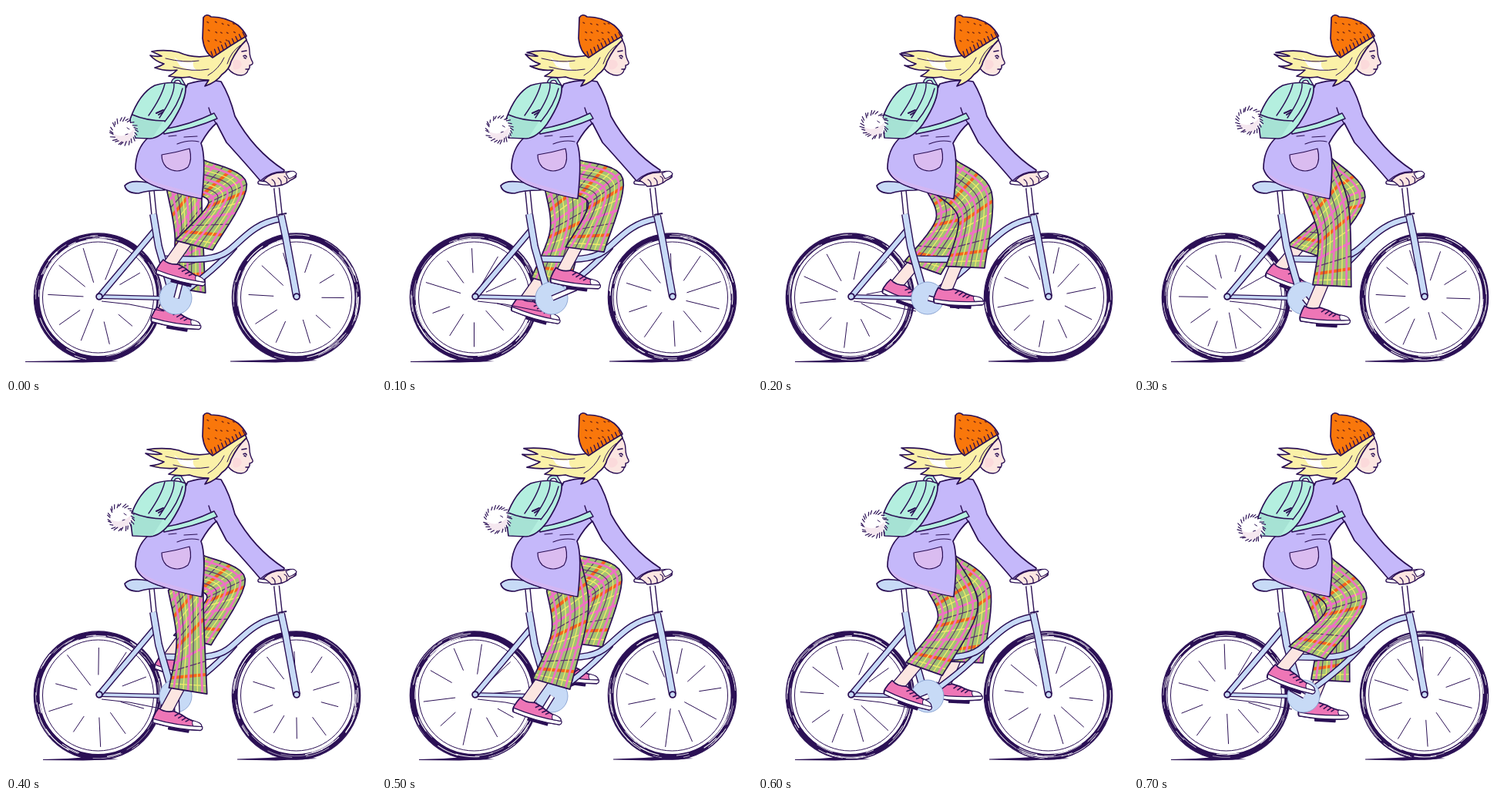
An HTML page with a canvas that plays this animation: 480x480 px, repeating every 800 ms.

```html
<!DOCTYPE html>
<html lang="en">
<head>
<meta charset="utf-8">
<title>Cyclist</title>
<style>
html, body { margin: 0; height: 100%; overflow: hidden; background: #fff; }
canvas { display: block; }
</style>
</head>
<body>
<canvas id="stage" width="480" height="480"></canvas>
<script>
const g = document.getElementById('stage').getContext('2d');
const INK = '#2b1055', BLUE = '#c7daf6', LILAC = '#c5b8fa', MINT = '#b4efdf', SKIN = '#fce6e1';
const STEP = 100, STEPS = 8, TAU = Math.PI * 2;
const HIP = [238, 214], THIGH = 64, SHIN = 127;

function random(seed) {
  return () => {
    seed = (seed * 16807 + 11) % 2147483647;
    return seed / 2147483647;
  };
}

function shape(d, fill, line = INK, width = 1.7) {
  const p = new Path2D(d);
  if (fill) { g.fillStyle = fill; g.fill(p); }
  if (line) { g.strokeStyle = line; g.lineWidth = width; g.stroke(p); }
}
const ink = (d, width = 1.4, color = INK) => shape(d, null, color, width);

function tube(d, width, color = BLUE) {
  ink(d, width + 2.6);
  ink(d, width - .2, color);
}

function arc(x, y, r, from, to, color, width) {
  g.beginPath();
  g.arc(x, y, r, from, to);
  g.strokeStyle = color;
  g.lineWidth = width;
  g.stroke();
}

function wheel(x, y, i, seed) {
  const rnd = random(seed + i * 977);
  arc(x, y, 79.5, 0, TAU, INK, 7);
  for (let k = 0; k < 34; k++) {
    const a = rnd() * TAU, r = 76.5 + rnd() * 6;
    arc(x + rnd() - .5, y, r, a, a + .1 + rnd() * .4, '#fff', .5 + rnd() * .6);
  }
  arc(x, y, 83.2, 0, TAU, INK, 1.2);
  arc(x, y, 72, 0, TAU, INK, 1);
  for (let k = 0; k < 10; k++) {
    const a = k / 10 * TAU + i * .21 + rnd() * .12, c = Math.cos(a), s = Math.sin(a);
    const r0 = 16 + rnd() * 20, r1 = 56 + rnd() * 12;
    ink(`M${x + c * r0} ${y + s * r0}L${x + c * r1} ${y + s * r1}`, 1);
  }
}

function ground(i) {
  const a = Math.min(48, 25 + 12 * i), b = Math.min(300, 291 + 4 * i);
  shape(`M${a} 461L80 460Q110 457 146 461L100 462.5L${a} 462Z`, INK, null);
  shape(`M${b} 460.5L340 459Q375 456 404 460L350 462.5L${b} 461.5Z`, INK, null);
}

// The pedal circle sets the foot; the knee follows from the two limb lengths.
function pose(i) {
  const turn = i / STEPS * TAU, a = turn - TAU / 4 + .1 * (1 - Math.cos(turn));
  const x = 204 + 30 * Math.cos(a), y = 362 + 33 * Math.sin(a);
  const tilt = (11 - 9 * Math.cos(a - .4)) * Math.PI / 180;
  const c = Math.cos(tilt), s = Math.sin(tilt);
  const foot = (u, v) => [x + u * c - v * s, y + u * s + v * c];

  const ankle = [x + 8, y + 4], dx = ankle[0] - HIP[0], dy = ankle[1] - HIP[1];
  const reach = Math.min(Math.hypot(dx, dy), THIGH + SHIN - 1);
  const bend = Math.acos((THIGH ** 2 + reach ** 2 - SHIN ** 2) / (2 * THIGH * reach));
  const swing = Math.atan2(dy, dx) - bend;
  const knee = [HIP[0] + THIGH * Math.cos(swing), HIP[1] + THIGH * Math.sin(swing)];

  const out = [knee[0] - HIP[0] - dx / 2, knee[1] - HIP[1] - dy / 2], len = Math.hypot(...out);
  const side = d => knee.map((n, k) => n + out[k] / len * d);
  return {
    x, y, tilt, foot,
    front: [[257, 200], side(17), foot(59, -28)],
    back: [[214 + (knee[0] - 254) * .4, 242], side(-38), foot(9, -28)]
  };
}

// Smooth curve through three points, t from 0 to 1.
function spline(p, t) {
  const k = t < .5 ? 0 : 1, f = t * 2 - k;
  const [a, b, d, e] = [k - 1, k, k + 1, k + 2].map(n => p[Math.max(0, Math.min(2, n))]);
  return b.map((n, c) => n + f / 2 * (d[c] - a[c] +
    f * (2 * a[c] - 5 * n + 4 * d[c] - e[c] + f * (3 * (n - d[c]) + e[c] - a[c]))));
}

// u runs from back edge to front edge, v from hip to hem.
function onLeg(p, u, v) {
  const f = spline(p.front, v);
  return spline(p.back, v).map((n, k) => n + (f[k] - n) * u);
}

const lengthwise = (p, u, back) =>
  Array.from({ length: 19 }, (_, k) => onLeg(p, u, (back ? 18 - k : k) / 18)).join('L');

function trousers(p) {
  const outline = 'M' + lengthwise(p, 1) + 'L' + lengthwise(p, 0, true) + 'Z';
  shape(outline, '#a3c272', null);
  g.save();
  g.clip(new Path2D(outline));
  const bands = [['#f4661c', 4], ['#f1ec6a', 1.4], ['#ee70c4', 3], ['#5a2f70', 1.2]];
  for (let k = 1; k < 14; k++) {
    const [color, width] = bands[k % 4], v = k / 14;
    ink(`M${onLeg(p, 0, v)}L${onLeg(p, 1, v)}`, width, color);
  }
  for (let k = 1; k < 8; k++) {
    const [color, width] = bands[1 + k % 3];
    ink('M' + lengthwise(p, k / 8), width * .9, color);
  }
  g.restore();
  ink(outline, 1.7);
}

function leg(i, far) {
  const p = pose(i);
  g.save();
  if (far) g.translate(-2, -4);
  tube(`M221 379L${p.foot(29, 23)}`, far ? 3 : 5, far ? INK : '#fff');
  shape(`M${onLeg(p, .08, .97)}L${p.foot(1, 4)}L${p.foot(17, 6)}L${onLeg(p, .42, .97)}Z`, SKIN, INK, 1.3);
  trousers(p);
  g.translate(p.x, p.y);
  g.rotate(p.tilt);
  shape('M17 20H43V25H17Z', INK);
  shape('M-5 13Q-6 18-4 20Q28 24 58 20Q61 14 55 11Q40 9 31 4L20 1Q8 5 0 0Q-3 5-5 13Z', '#ee76b6');
  shape('M-5 15Q26 19 60 15Q61 19 58 20Q28 24-4 20Z', '#fff', INK, 1.2);
  shape('M47 9Q59 10 59 15L48 16Q45 12 47 9Z', '#fff', INK, 1);
  ink('M22 7L27 3M27 9L32 5M32 11L37 7M37 12L41 9', 1.5);
  g.restore();
}

function frame() {
  tube('M121 377L201 379', 3.5);
  ink('M124 383L160 387L205 396', 1.1);
  tube('M194 290L121 377', 6);
  tube('M297 312Q272 342 226 374', 6);
  tube('M356 276C320 282 306 305 288 318S245 329 206 328', 6.5);
  tube('M189 240L192 270', 5, '#fff');
  tube('M191 270L198 312L214 368', 7.5);
  tube('M351 236L355 272', 5.5, '#fff');
  tube('M357 272L363 300L377 377', 7.5);
  ink('M353 271L364 269', 2);
  g.beginPath();
  g.arc(220, 379, 21, 0, TAU);
  g.fillStyle = BLUE;
  g.fill();
  arc(220, 379, 21, 0, TAU, '#8fa7d4', 1);
  for (const [x, y] of [[121, 377], [377, 377]]) {
    arc(x, y, 3.8, 0, TAU, INK, 2);
    arc(x, y, 1.4, 0, TAU, BLUE, 2.6);
  }
  shape('M154 233Q160 226 176 228L208 232Q216 238 203 239Q184 239 172 243Q156 243 154 233Z', BLUE);
}

function jacket() {
  shape('M236 101Q258 94 279 98Q290 116 297 143Q321 187 361 213L359 219L331 228Q315 209 286 177L273 152Q263 160 253 178Q260 196 254 250Q231 246 197 235Q172 226 168 211Q168 186 184 171Q210 153 225 122Z', LILAC);
  shape('M170 211Q176 224 205 232L252 245V249Q220 243 197 234Q174 227 170 211Z', '#d3b6f2', null);
  ink('M263 132Q266 143 273 153M331 226Q345 214 360 215');
  shape('M202 193Q221 190 238 185Q242 200 236 209Q222 219 208 209Q202 203 202 193Z', '#dabcf0', INK, 1.2);
  ink('M211 169L221 168M222 179Q237 173 250 176M231 170L248 169', 1.2);
}

function backpack() {
  shape('M204 160Q239 154 270 139L274 146Q245 159 205 166Z', MINT, INK, 1.5);
  ink('M216 101Q217 93 226 95L232 105', 5);
  ink('M216 101Q217 93 226 95L232 105', 2.4, MINT);
  shape('M161 147Q173 113 193 103Q216 96 233 103Q235 121 214 153Q201 171 187 172L164 171Z', MINT);
  shape('M164 141L204 149L190 171L165 170Z', '#a6e2d4', null);
  ink('M164 141Q182 149 206 149M218 101Q219 116 199 145M206 101Q202 118 185 142M229 107Q224 128 206 150');
  ink('M195 139L204 135M198 141L203 138', 2);
}

function pompom(i) {
  const turn = i / STEPS * TAU + .1, rnd = random(31 + i * 53);
  const x = 151 + 2 * Math.cos(turn), y = 155 + 8 * Math.cos(turn);
  const at = (r, a) => `${x + r * Math.cos(a)} ${y + r * Math.sin(a)}`;
  let d = '';
  for (let k = 0; k < 44; k++) d += (k ? 'L' : 'M') + at(k % 2 ? 14 : 16.5 + rnd() * 2.5, k / 44 * TAU);
  shape(d + 'Z', '#fff', null);
  shape(`M${x - 13} ${y + 3}Q${x} ${y + 10} ${x + 13} ${y - 3}Q${x + 12} ${y + 15} ${x} ${y + 15}T${x - 13} ${y + 3}Z`, '#f5e8f0', null);
  for (let k = 0; k < 25; k++) {
    const a = k / 25 * TAU + rnd() * .15;
    ink(`M${at(13 + rnd() * 2, a)}L${at(17 + rnd() * 2, a + .18)}`, 1.2);
  }
  ink(`M${x + 4} ${y - 5}l3 2M${x + 2} ${y + 4}l3 -1`, 1);
}

function head(i) {
  const turn = i / STEPS * TAU, w = Math.sin(turn), tip = 186 + 3 * Math.cos(turn);
  shape('M309 40Q316 49 316 59Q316 66 320 73Q321 76 316 77Q317 80 314 83Q313 89 305 90Q295 90 288 81L291 64Z', SKIN, INK, 1.4);
  shape('M294 71Q304 67 306 76Q303 84 295 82Z', '#fbdadb', null);
  ink('M308 65Q311 63 312 66M309 67L311 68M306 59L312 58M311 82L315 82', 1.6);
  shape(`M267 64Q244 69 224 60Q207 56 ${tip} ${59 + w * 2}Q196 62 202 65
    Q194 66 ${tip - 2} ${64 - w * 2}Q194 72 205 75Q199 79 ${tip + 4} ${80 - w * 3}Q206 85 222 83
    Q217 88 211 91Q227 94 238 92Q248 96 263 96L258 104Q273 99 280 89Q290 82 292 72Q300 55 312 44L309 36Z`, '#fbf1a8');
  shape('M218 66Q229 76 243 72Q241 79 248 84Q235 83 226 78Z', '#fff', null);
  ink('M207 68Q231 74 250 71M217 79Q242 86 263 82M283 67Q276 82 262 90M304 51Q292 59 287 75', 1);
  shape('M256 15Q260 9 266 14Q286 14 301 25Q308 31 312 39Q293 50 268 67Q257 60 255 42Z', '#f9770b');
  for (let k = 0; k < 10; k++) {
    const t = k / 9;
    ink(`M${268 + 42 * t} ${65 - 25 * t}l${-2 - t} -6`, 1.3);
  }
  const rnd = random(77 + i % 2);
  for (let k = 0; k < 15; k++) {
    const x = 261 + (k % 5) * 8 + rnd() * 4, y = 20 + Math.floor(k / 5) * 11 + rnd() * 5;
    if (x + y < 338) ink(`M${x} ${y}l1.6 1`, 1.5, '#7a2c16');
  }
}

function hands() {
  tube('M329 229Q350 233 374 221', 3, '#fff');
  shape('M334 226Q343 216 359 216Q374 212 376 218Q378 222 369 226Q361 234 344 234Q341 230 334 226Z', SKIN, INK, 1.4);
  ink('M345 225Q350 228 349 234M353 223Q358 226 357 232M361 221Q366 223 364 229', 1.2);
  shape('M363 217Q374 211 377 218Q374 222 367 224Z', '#fff', INK, 1.2);
}

function draw(now) {
  const i = Math.floor(now / STEP) % STEPS;
  g.fillStyle = '#fff';
  g.fillRect(0, 0, 480, 480);
  g.lineJoin = 'round';
  g.lineCap = 'butt';
  ground(i);
  wheel(119.5, 378, i, 5);
  wheel(376.5, 378, i, 19);
  leg(i + STEPS / 2, true);
  frame();
  leg(i, false);
  g.lineCap = 'round';
  jacket();
  backpack();
  pompom(i);
  head(i);
  hands();
}

const start = performance.now();
function tick() {
  draw(performance.now() - start);
  requestAnimationFrame(tick);
}
tick();
</script>
</body>
</html>
```
